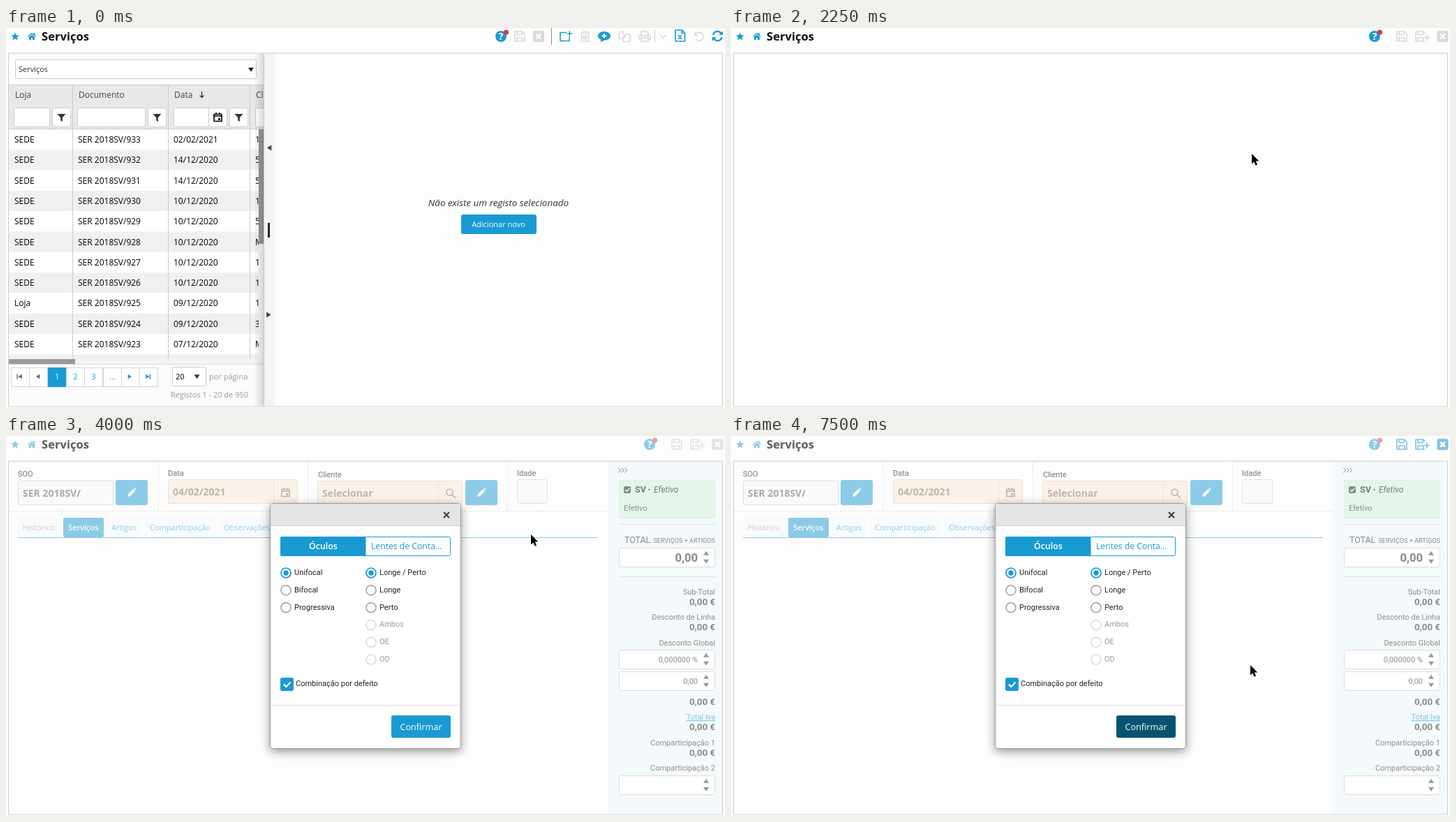
An HTML page for the animation above (8 s loop, 1030x544 px).

```html
<!DOCTYPE html>
<html lang="pt">
<head>
<meta charset="utf-8">
<title>Serviços</title>
<style>
html, body { margin: 0; width: 100%; height: 100%; overflow: hidden; background: #fdfdfd; }
svg { display: block; width: 1030px; height: 544px; }
text { font-family: "Open Sans", sans-serif; font-size: 11px; white-space: pre; }
.r { font-family: Roboto, sans-serif; }
.l { fill: none; stroke: currentColor; stroke-width: 1.6; stroke-linejoin: round; }
.blue { color: #1a9ad2; }
.gray { color: #d9d9d9; }
.pale { color: #8ccbe8; }
.anim { animation: 8s step-end infinite; }
#list, #listBar { animation-name: list; }
#pageBar { animation-name: page; }
#title, #marks { animation-name: dimTitle; }
#marks, #help { animation-name: dim; }
#saves { animation-name: saves; }
#ghost { animation-name: ghost; }
#dot { animation-name: dot; }
#form0 { animation-name: form0; }
#form1 { animation-name: form1; }
#form2 { animation-name: form2; }
#dialog { animation-name: dialog; filter: drop-shadow(0 4px 7px rgba(0,0,0,.4)); }
#add { animation-name: add; }
#ok { animation-name: ok; }
#cursor { animation-name: move; }
@keyframes list { 0% { opacity: 1 } 28.125%, 100% { opacity: 0 } }
@keyframes page { 0% { opacity: 0 } 28.125%, 100% { opacity: 1 } }
@keyframes dimTitle { 0% { opacity: 1 } 43.75%, 100% { opacity: .68 } }
@keyframes dim { 0% { opacity: 1 } 43.75%, 100% { opacity: .5 } }
@keyframes saves {
  0% { color: #d9d9d9 } 43.75% { color: #ececec } 50% { color: #e2e2e2 }
  56.25%, 100% { color: #7cc4e4 }
}
@keyframes ghost { 0% { opacity: 0 } 31.25% { opacity: 1 } 43.75%, 100% { opacity: 0 } }
@keyframes dot { 0% { opacity: 0 } 34.375% { opacity: 1 } 43.75%, 100% { opacity: 0 } }
@keyframes form0 { 0% { opacity: 0 } 43.75% { opacity: .55 } 46.875%, 100% { opacity: 0 } }
@keyframes form1 { 0% { opacity: 0 } 46.875% { opacity: .8 } 50%, 100% { opacity: 0 } }
@keyframes form2 { 0% { opacity: 0 } 50%, 100% { opacity: 1 } }
@keyframes dialog { 0% { opacity: 0 } 43.75%, 100% { opacity: 1 } }
@keyframes add { 0% { fill: #1a9ad2 } 18.75%, 100% { fill: #11739d } }
@keyframes ok { 0% { fill: #1a9ad2 } 81.25% { fill: #11739d } 84.375%, 100% { fill: #07536f } }
@keyframes move {
  0% { transform: translate(-40px, -40px) }
  6.25% { transform: translate(782px, 284px) }
  9.375% { transform: translate(738px, 244px) }
  12.5% { transform: translate(700px, 228px) }
  18.75% { transform: translate(714px, 272px) }
  21.875% { transform: translate(712px, 277px) }
  25% { transform: translate(727px, 260px) }
  28.125% { transform: translate(746px, 180px) }
  31.25% { transform: translate(752px, 141px) }
  56.25% { transform: translate(742px, 166px) }
  59.375% { transform: translate(698px, 214px) }
  62.5% { transform: translate(642px, 246px) }
  65.625% { transform: translate(570px, 255px) }
  68.75% { transform: translate(520px, 250px) }
  71.875% { transform: translate(518px, 226px) }
  75% { transform: translate(541px, 296px) }
  78.125% { transform: translate(573px, 372px) }
  81.25% { transform: translate(593px, 416px) }
  87.5% { transform: translate(625px, 402px) }
  90.625% { transform: translate(705px, 352px) }
  93.75%, 100% { transform: translate(744px, 328px) }
}
</style>
</head>
<body>
<svg id="stage" viewBox="0 0 1030 544"></svg>
<script>
const text = (x, y, s, attrs = '') => `<text x="${x}" y="${y}" ${attrs}>${s}</text>`;
const rtext = (x, y, s, attrs = '') => text(x, y, s, 'class="r" ' + attrs);
const rect = (x, y, w, h, fill, attrs = '') =>
  `<rect x="${x}" y="${y}" width="${w}" height="${h}" fill="${fill}" ${attrs}/>`;
const box = (x, y, w, h, fill = '#fff', stroke = '#ccc', rx = 2) =>
  rect(x + .5, y + .5, w - 1, h - 1, fill, `stroke="${stroke}" rx="${rx}"`);
const path = (d, fill, attrs = '') => `<path d="${d}" fill="${fill}" ${attrs}/>`;
const line = (d, stroke = '#ccc', attrs = '') => path(d, 'none', `stroke="${stroke}" ${attrs}`);
const circle = (x, y, r, fill, attrs = '') =>
  `<circle cx="${x}" cy="${y}" r="${r}" fill="${fill}" ${attrs}/>`;
const at = (x, y, s, cls = '') => `<g transform="translate(${x} ${y})" class="${cls}">${s}</g>`;
const anim = (id, s) => `<g id="${id}" class="anim">${s}</g>`;
const stroke = d => `<path class="l" d="${d}"/>`;
const solid = d => path(d, 'currentColor');
const end = 'text-anchor="end" ', mid = 'text-anchor="middle" ';

// Triangles pointing down, up, left and right, centred on x, y
const down = (x, y, c = '#333', r = 4) => path(`M${x - r} ${y - r * .7}h${2 * r}l${-r} ${r * 1.5}z`, c);
const up = (x, y, c, r = 4) => path(`M${x - r} ${y + r * .7}h${2 * r}l${-r} ${-r * 1.5}z`, c);
const left = (x, y, c, r = 4) => path(`M${x + r * .7} ${y - r}v${2 * r}l${-r * 1.6} ${-r}z`, c);
const right = (x, y, c, r = 4) => path(`M${x - r * .7} ${y - r}v${2 * r}l${r * 1.6} ${-r}z`, c);

const icon = {
  save: stroke('M1 1h10.500l3.500 3.500v10.500h-14zM4 1v4.500h7v-4.500M4 15v-5h8v5'),
  close: rect(0, 0, 16, 16, 'currentColor', 'rx="3"') +
    line('M4.500 4.500l7 7m0-7l-7 7', '#fff', 'stroke-width="2.600"'),
  plus: stroke('M0 4h8M4 0v8'),
  open: stroke('M10 2.500h-9v12h13v-6M10.500 4h7.500M14.300 .3v7.500'),
  trash: stroke('M1 3.500h13M5 3v-2h5v2M2.500 4v11h10v-11M5.500 6.500v6m2-6v6m2-6v6'),
  chat: solid('M9 1c5 0 9 2.600 9 6.200s-4 6.300-9 6.300l-5.500 2.800 .8-3.800c-2.700-1.100-4.300-3.100-4.300-5.300c0-3.600 4-6.200 9-6.200z') +
    line('M5.500 7.200h7M9 3.700v7', '#fff', 'stroke-width="2"'),
  copy: stroke('M7 5V1H4.500L1 4.500V11h6M7 8.500L10.500 5H17v10.500H7zM10.500 5v3.500H7'),
  print: stroke('M4 7V1h8l2 2v4M4 12H1V7h16v5h-3M4 10h10v5.500H4z'),
  sheet: stroke('M1 1h9.500l4 4v12h-13.500zM10 1v4.500h4.500M5 8l5 6m0-6l-5 6'),
  undo: stroke('M3 3v4.500h4.500M3.500 7a6 6 0 1 1 1 6') ,
  sync: `<g stroke-width="2">${line('M2 7a6.200 6.200 0 0 1 11.500-2M14.500 10a6.200 6.200 0 0 1-11.500 2', 'currentColor', 'stroke-width="2.300"')}</g>` +
    solid('M16 1v6h-6zM.5 16v-6h6z'),
  pencil: path('M-6 6l1-4 7-7 3 3-7 7zM3-6l1-1 3 3-1 1z', '#fff'),
  calendar: stroke('M1 2.500h11v10h-11zM1 5h11M4 0v3M9 0v3') + rect(7, 8, 3, 3, 'currentColor'),
  search: stroke('M5.500 1a4.500 4.500 0 1 1 0 9a4.500 4.500 0 1 1 0-9M9 9l5 5'),
};

const helpIcon = x => circle(x, 12, 8, '#1a9ad2') +
  text(x, 17, '?', mid + 'fill="#fff" font-weight="700" style="font-size:14px"') +
  circle(x + 7.5, 6.2, 3.6, '#dc3848');

const star = Array.from({ length: 10 }, (_, i) => {
  const a = i * Math.PI / 5 - Math.PI / 2, r = i % 2 ? 2.8 : 6.3;
  return [13 + r * Math.cos(a), 12.5 + r * Math.sin(a)];
}).join(' ');

function commonHead() {
  return anim('marks', `<polygon points="${star}" fill="#1a9ad2"/>` +
      path('M31 12l6-5.200 2.500 2.100v-1.600h1.700v3.100l1.800 1.600-.8.900-5.200-4.500-5.200 4.500z' +
        'M33 13l4-3.400 4 3.400v4h-3v-3h-2v3h-3z', '#1a9ad2')) +
    anim('title', text(51, 18, 'Serviços', 'font-weight="700" fill="#111" style="font-size:16.6px"'));
}

function listBar() {
  return helpIcon(709) +
    at(728, 4, icon.save, 'gray') + at(755, 4, icon.close, 'gray') +
    line('M781.500 0v24', '#888') +
    at(793, 4, icon.open, 'blue') + at(822, 4, icon.trash, 'gray') +
    at(848, 4, icon.chat, 'blue') + at(877, 4, icon.copy, 'gray') +
    at(906, 4, icon.print, 'gray') + line('M929.500 2v18', '#ccc') +
    at(937, 10, stroke('M0 0l4.500 4 4.500-4'), 'gray') +
    at(958, 2, icon.sheet, 'blue') + at(984, 3, icon.undo, 'gray') + at(1011, 3, icon.sync, 'blue');
}

function pageBar() {
  return anim('help', helpIcon(922)) + anim('saves',
    at(953, 4, icon.save) + at(980, 4, icon.save) + rect(993, 8, 9, 11, '#fdfdfd') +
    at(993, 9.5, icon.plus) + at(1011.5, 4, icon.close));
}

const rows = [
  ['02/02/2021', '1'], ['14/12/2020', '5'], ['14/12/2020', '5'], ['10/12/2020', '1'],
  ['10/12/2020', '5'], ['10/12/2020', 'M'], ['10/12/2020', '1'], ['10/12/2020', '1'],
  ['09/12/2020', '1'], ['09/12/2020', '3'], ['07/12/2020', 'M'], ['', ''],
];

function table() {
  const t12 = 'style="font-size:12px" ';
  const funnel = x => box(x, 114, 27, 28) +
    path(`M${x + 7.5} 123h12l-4.700 5.200v6l-2.600-2v-4z`, '#333');
  let s = rect(4, 82, 365, 62, '#e8e8e8') + line('M4 81.500h365M4 144.500h365');
  rows.forEach(([date, client], i) => {
    const y = 145 + 29.3 * i, h = Math.min(29.3, 474 - y), base = Math.round(y + 19);
    s += rect(4, y, 358, h, i % 2 ? '#f0f0f0' : '#fff');
    if (!date) return;
    s += text(12, base, i === 8 ? 'Loja' : 'SEDE', t12) +
      text(103, base, 'SER 2018SV/' + (933 - i), t12) + text(240, base, date, t12) +
      text(357, base, client, t12 + 'clip-path="url(#cell)"');
  });
  s += line('M95.500 82v392M232.500 82v392M349.500 82v392');
  const head = t12 + 'fill="#444"';
  s += text(13, 100, 'Loja', head) + text(104, 100, 'Documento', head) + text(241, 100, 'Data', head) +
    `<g clip-path="url(#left)">${text(358, 100, 'Cliente', head)}${box(357, 114, 30, 28)}</g>` +
    line('M280.500 91v8.500M277.500 96.500l3 3 3-3', '#333', 'stroke-width="1.300"') +
    box(11, 114, 52, 28) + funnel(66) + box(102, 114, 98, 28) + funnel(203) +
    box(240, 114, 51, 28) + box(290, 114, 27, 28) + at(297, 121, icon.calendar) + funnel(320);
  return s + rect(362, 145, 7, 329, '#fafafa') + rect(362, 145, 7, 164, '#999') +
    rect(4, 474, 365, 7, '#f4f4f4') + rect(4, 474, 95, 7, '#999');
}

function pager() {
  const labels = ['', '', '1', '2', '3', '...', '', ''];
  let s = rect(4, 482, 365, 59, '#fbfbfb') + line('M4 481.500h365', '#ddd');
  labels.forEach((label, i) => {
    const x = 7 + Math.round(26.3 * i), on = i === 2;
    s += box(x, 486, 27, 28, on ? '#1a9ad2' : '#fff', on ? '#1a9ad2' : '#d5d5d5', 0) +
      text(x + 13.5, 503, label, mid + `fill="${on ? '#fff' : '#1a9ad2'}"`);
  });
  return s + left(20.5, 499, '#666', 3.3) + rect(15.5, 495.5, 1.5, 7, '#666') + left(46, 499, '#666', 3.3) +
    right(177, 499, '#1a9ad2', 3.3) + right(202.5, 499, '#1a9ad2', 3.3) + rect(205.5, 495.5, 1.5, 7, '#1a9ad2') +
    box(238, 485, 49, 28) + text(243, 503, '20') + down(273.5, 499) +
    text(291, 503, 'por página', 'fill="#999"') +
    text(347, 529, 'Registos 1 - 20 de 950', end + 'fill="#999"');
}

function list() {
  return box(13, 45, 346, 28) + text(18, 63, 'Serviços', 'fill="#333"') + down(351, 59.5, '#222') +
    table() + pager() + rect(355, 37, 14, 504, 'url(#edge)') +
    rect(369, 37, 16, 504, '#f4f4f4') + line('M369.500 37v504', '#c4c4c4') +
    left(377.5, 171.5, '#444') + right(376, 410.5, '#444') + rect(375, 279, 3, 21, '#222') +
    text(705.5, 255, 'Não existe um registo selecionado', mid + 'font-style="italic" fill="#333" style="font-size:13.5px"') +
    '<rect id="add" class="anim" x="652" y="267" width="108" height="28" rx="3"/>' +
    text(705.5, 285, 'Adicionar novo', mid + 'fill="#fff"');
}

const price = (x, y, s = '0,00 €', size = 13.3) =>
  rtext(x, y, s, end + `font-weight="700" fill="#8a8a8a" style="font-size:${size}px"`);

function sidebar(wide) {
  const label = (y, s) => rtext(1016, y, s, end + 'fill="#8d8d8d"');
  const field = (y, h = 28) => box(878, y, 138, h, '#fff', '#ddd') +
    up(1003, y + 8, '#999') + down(1003, y + h - 8.5, '#999');
  const body = rect(878.5, 63.5, 137, 54, '#e6f5e9', 'stroke="#cfe9d5" stroke-dasharray="2 2"') +
    rect(885, 72, 10, 10, '#7d8f83', 'rx="2"') + line('M887 77l2.300 2.300 4-4.500', '#e6f5e9', 'stroke-width="1.600"') +
    rtext(901, 81, 'SV', 'font-weight="700" fill="#6f8076" style="font-size:12.5px"') +
    rtext(919.5, 81, '•', 'fill="#6f8076"') +
    rtext(928, 81, 'Efetivo', 'font-style="italic" fill="#6f8076" style="font-size:12px"') +
    rtext(885, 107, 'Efetivo', 'fill="#7a9a83"') +
    line('M878 126.500h138M878 201.500h138', '#dde3e5') +
    rtext(886, 153, 'TOTAL', 'fill="#8a8a8a" style="font-size:12.4px"') +
    rtext(1016, 153, 'SERVIÇOS + ARTIGOS', end + 'fill="#8a8a8a" style="font-size:9.1px"') +
    field(160) + price(991, 180, '0,00', 16.6) +
    label(227, 'Sub-Total') + price(1016, 242) + label(263, 'Desconto de Linha') + price(1016, 278) +
    label(300, 'Desconto Global') +
    field(306) + rtext(991, 324, '0,000000 %', end + 'fill="#8d8d8d"') +
    field(337) + rtext(991, 355, '0,00', end + 'fill="#8d8d8d"') +
    price(1016, 385) + rtext(1016, 406, 'Total Iva', end + 'fill="#7cc4e4" text-decoration="underline"') +
    price(1016, 421) + label(443, 'Comparticipação 1') + price(1016, 458) +
    label(479, 'Comparticipação 2') + field(486);
  const x = 862 + 73 * wide;
  return rect(x, 37, 1027 - x, 504, '#f4f9fb') +
    at(72 * wide, 0, line('M877.500 45.500l3 3.500-3 3.500m4.500-7l3 3.500-3 3.500m4.500-7l3 3.500-3 3.500', '#888')) +
    at(93 * wide, 0, body);
}

// wide runs from 1 (side column still sliding in) to 0 (settled)
function form(wide) {
  const w = n => n * wide;
  const label = (x, y, s) => rtext(x, y, s, 'fill="#777"');
  const value = (x, y, s, c) => text(x, y, s, `font-weight="700" fill="${c}" style="font-size:14px"`);
  const edit = x => rect(x, 63, 46, 36, '#8ccbe8', 'rx="3"') + at(x + 23, 81, icon.pencil);
  const warm = (x, y, width) => box(x, y, width, 35, '#faf2ea', '#ecdfd2') +
    line(`M${x + width - 34.5} ${y}v35`, '#ecdfd2');
  const dx = 232 + w(18), cx = 446 + w(36), ix = 732 + w(60), tan = '#c3b3a5';
  const tabs = [[17, 61, 'Histórico'], [82, 58, 'Serviços'], [144, 51, 'Artigos'],
    [199, 102, 'Comparticipação'], [305, 80, 'Observações']];
  return line(`M${218.5 + w(17)} 37v70M${432.5 + w(36)} 37v70M${718.5 + w(60)} 37v70M4 107.500h${858 + w(73)}`,
      '#ddd', 'stroke-dasharray="2 2"') +
    label(17, 58, 'SOO') + box(17, 64, 137 + w(18), 35, '#fafafa', '#ddd') +
    value(24, 87, 'SER 2018SV/', '#aaa') + edit(157 + w(18)) +
    label(dx, 57, 'Data') + warm(dx, 62, 186 + w(18)) + value(dx + 7, 85, '04/02/2021', tan) +
    `<g color="${tan}">${at(dx + 162, 74, icon.calendar)}${at(cx + 184, 75, icon.search)}</g>` +
    label(cx + 1, 59, 'Cliente') + warm(cx, 64, 208 + w(24)).replace('/>', '/>') +
    `<g color="${tan}">${at(cx + 184 + w(24), 75, icon.search)}</g>` +
    value(cx + 7, 87, 'Selecionar', tan) + edit(658 + w(60)) +
    label(ix, 57, 'Idade') + box(ix, 62, 44 + w(6), 35, '#fafafa', '#e2e2e2') +
    tabs.map(([x, width, s], i) => rect(x, 117, width, 28, i === 1 ? '#8ccbe8' : '#f9fafb', 'rx="2"') +
      text(x + 7, 135, s, i === 1 ? 'fill="#fff" font-weight="600"' : `fill="${i ? '#8ccbe8' : '#ccc'}"`)).join('') +
    line(`M17 145.500H${848 + w(71)}`, '#8ccbe8') + sidebar(wide);
}

function dialog() {
  const radio = (x, y, s, state = '') => {
    const on = state === 'on', off = state === 'off';
    return circle(x, y, 7, '#fff', `stroke="${on ? '#1a9ad2' : off ? '#ddd' : '#aaa'}" stroke-width="1.700"`) +
      (on ? circle(x, y, 3.7, '#1a9ad2') : '') +
      rtext(x + 12, y + 3, s, `fill="${off ? '#999' : '#222'}"`);
  };
  const kinds = ['Unifocal', 'Bifocal', 'Progressiva'];
  const uses = ['Longe / Perto', 'Longe', 'Perto', 'Ambos', 'OE', 'OD'];
  return box(378, 96, 274, 352, '#fff', '#999', 4) +
    path('M379 128.500V100q0-3 3-3H648q3 0 3 3V128.500z', '#e5e5e5') + line('M379 128.500h272') +
    line('M627 109l8 8m0-8l-8 8', '#444', 'stroke-width="2.300"') +
    box(393, 144, 244, 28, '#fff', '#1a9ad2') + rect(393, 144, 122.5, 28, '#1a9ad2', 'rx="2"') +
    text(454.5, 162, 'Óculos', mid + 'fill="#fff" font-weight="600" style="font-size:12.4px"') +
    text(523, 162, 'Lentes de Conta...', 'fill="#1a9ad2" style="font-size:12.2px"') +
    kinds.map((s, i) => radio(401, 196 + 24.8 * i, s, i ? '' : 'on')).join('') +
    uses.map((s, i) => radio(523, 196 + 24.8 * i, s, i > 2 ? 'off' : i ? '' : 'on')).join('') +
    rect(393, 346, 19, 19, '#1a9ad2', 'rx="3"') + line('M398 355.500l3.500 3.500 6-6.500', '#fff', 'stroke-width="2.200"') +
    rtext(415, 358, 'Combinação por defeito', 'fill="#222"') +
    line('M379 385.500h272', '#ddd') +
    '<rect id="ok" class="anim" x="552" y="400" width="85" height="32" rx="3"/>' +
    text(594.5, 421, 'Confirmar', mid + 'fill="#fff" font-weight="500" style="font-size:12.7px"');
}

// The search mark belongs to the client field only
const settle = s => s;

document.getElementById('stage').innerHTML =
  `<defs>
    <clipPath id="cell"><rect x="350" y="145" width="12" height="329"/></clipPath>
    <clipPath id="left"><rect x="350" y="82" width="19" height="62"/></clipPath>
    <clipPath id="panel"><rect x="4" y="37" width="1022.500" height="504"/></clipPath>
    <linearGradient id="edge"><stop stop-opacity="0"/><stop offset="1" stop-opacity=".14"/></linearGradient>
  </defs>` +
  rect(0, 0, 1030, 544, '#fdfdfd') + commonHead() +
  anim('listBar', listBar()) + anim('pageBar', pageBar()) +
  anim('list', list()) +
  anim('ghost', circle(435, 289, 3.5, 'none', 'stroke="#f3f8fb" stroke-width="1.500"')) +
  anim('dot', circle(470, 289, 3.3, 'none', 'stroke="#cfe5f1" stroke-width="1.500"')) +
  `<g clip-path="url(#panel)">${[1, .3, 0].map((wide, i) => anim('form' + i, settle(form(wide)))).join('')}</g>` +
  rect(3.5, 36, 1023, 506, 'none', 'stroke="#ccc"') +
  anim('dialog', dialog()) +
  anim('cursor', path('M0 0V14.500L3.300 11.500 5.600 16.700 8 15.600 5.800 10.500H10.300Z', '#000',
    'stroke="#fff" stroke-width="1" paint-order="stroke"'));
</script>
</body>
</html>
```
